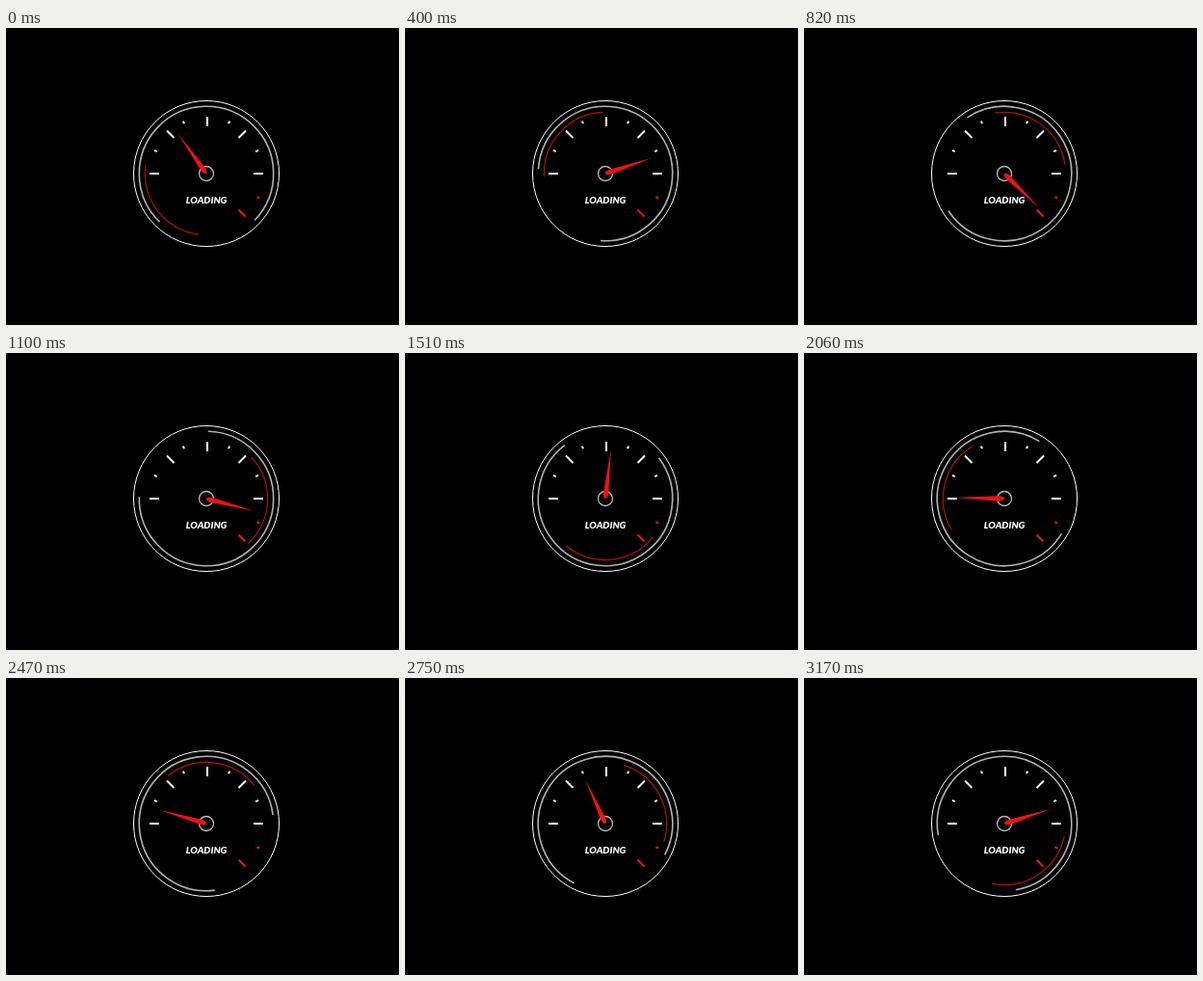
An HTML page that plays this animation: 408 px wide and 308 px high, repeating every 3270 ms.

```html
<!DOCTYPE html>
<html lang="en">
<head>
<meta charset="utf-8">
<title>Loading gauge</title>
<style>
  html, body { margin: 0; width: 100%; height: 100%; overflow: hidden; background: #000; }
  svg { display: block; width: 408px; height: 308px; }
  .line { fill: none; stroke: #fff; }
  .red { stroke: #f01414; }
  text { font: italic 900 10px Lato, sans-serif; fill: #fff; text-anchor: middle; }
</style>
</head>
<body>
<svg viewBox="0 0 408 308">
  <g transform="translate(208 151)">
    <circle class="line" r="75.5"/>
    <circle class="line" id="track" r="69.7" pathLength="360"
            stroke-dasharray="270 90" style="stroke:#b2b2b2" stroke-width="1.6"/>
    <circle class="line" id="glow" r="63.6" pathLength="360"
            stroke-dasharray="90 270" style="stroke:#b01010" stroke-width="1.2"/>
    <g stroke-width="2">
      <path class="line" d="M-59 0h10M49 0h10M1-59v10M-41-44.5l7.5 7.5M41-44.5l-7.5 7.5"/>
      <path class="line" d="M-24.2-54.4l1.2 2.6M24.2-54.4l-1.2 2.6M-54-24.2l2.8 1.3M54-24.2l-2.8 1.3"/>
      <path class="line red" d="M33.5 37.5l7 7M52.4 24.2l2.8 1.3"/>
    </g>
    <circle class="line" r="7.5" style="stroke:#b8b8b8" stroke-width="1.3"/>
    <path id="needle" fill="#ee1212" d="M0-51L2.6-7Q2.6 0 0 0Q-2.6 0-2.6-7Z"/>
    <text x="0" y="31">LOADING</text>
  </g>
</svg>
<script>
  const LOOP = 3270;
  // The dial moves in uneven steps; each pose holds until the next time.
  const STEPS = [0, 130, 270, 400, 550, 680, 820, 970, 1100, 1240, 1360, 1510,
    1640, 1780, 1930, 2060, 2200, 2320, 2470, 2600, 2750, 2890, 3020, 3170];
  const LOW = -90, HIGH = 135;

  const [track, glow, needle] = ['track', 'glow', 'needle'].map(id => document.getElementById(id));
  const turn = (el, angle) => el.setAttribute('transform', `rotate(${angle.toFixed(2)})`);

  function sweep(t, start, duration, from, to) {
    const p = Math.min(1, Math.max(0, (t - start) / duration));
    return from + (to - from) * (1 - Math.cos(Math.PI * p)) / 2;
  }

  function needleAngle(t) {
    if (t < 815) return sweep(t, -416, 1268, LOW, HIGH);
    if (t < 2214) return sweep(t, 778, 1342, HIGH, LOW);
    return sweep(t, 2214, 1478, LOW, HIGH);
  }

  const origin = performance.now();
  function draw() {
    const now = (performance.now() - origin) % LOOP;
    const t = STEPS.findLast(step => step <= now);
    turn(track, 134 + t * 0.125);
    turn(glow, 97.5 + t * 0.2);
    turn(needle, needleAngle(t));
    requestAnimationFrame(draw);
  }
  draw();
</script>
</body>
</html>
```
